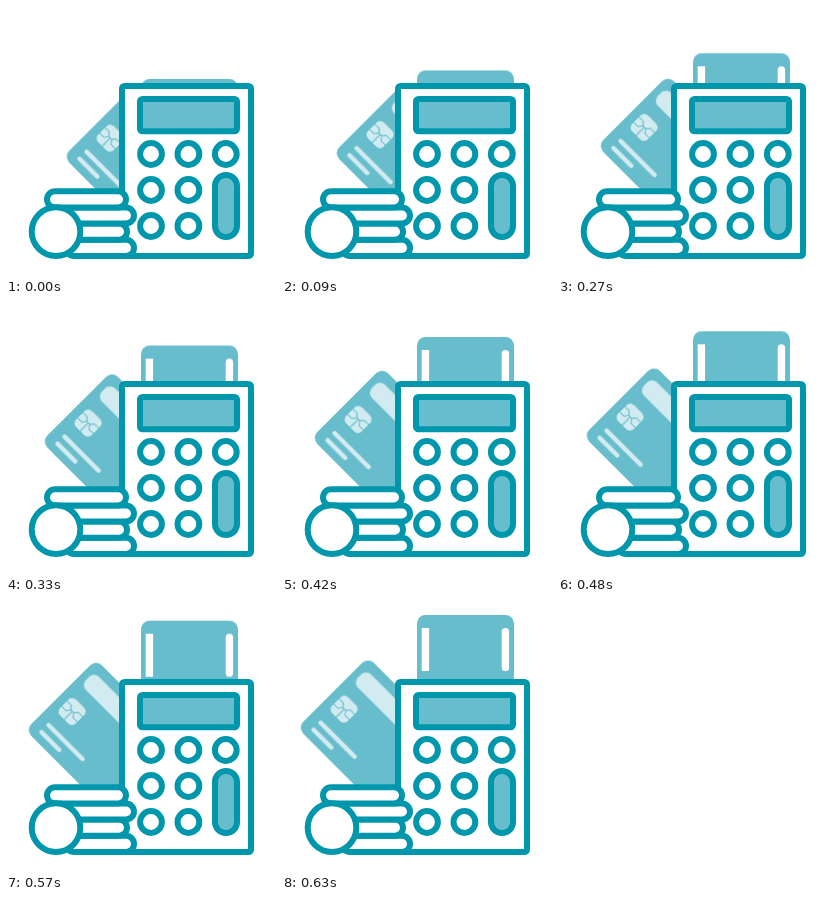
These frames come from a looping animation (270x270 px, 1.26 s). An HTML page without scripts:

```html
<!DOCTYPE html>
<html lang="en">
<head>
<meta charset="utf-8">
<title>Calculator, card and coins</title>
<style>
  :root { --dark: #0097ac; --mid: #67bdcc; --pale: #d1ebf0; }
  html, body { margin: 0; width: 100%; height: 100%; overflow: hidden; background: #fff; }
  svg { display: block; width: 100%; height: 100%; }
  .line { fill: #fff; stroke: var(--dark); stroke-width: 6; }
  .mid { fill: var(--mid); }
  .pale { fill: var(--pale); }
  .white { fill: #fff; }
  .print { stroke: var(--pale); stroke-width: 4.6; stroke-linecap: round; }
  .etch { fill: none; stroke: var(--mid); stroke-width: 1.2; }

  /* Both parts slide out in even steps for half the loop, then rest */
  .slide { animation: slide 1260ms -2ms infinite; }
  .card { --from: translate(42px, 25px); }
  .paper { --from: translate(0, 60px); }
  @keyframes slide {
    0% { transform: var(--from); animation-timing-function: steps(21, end); }
    50%, 100% { transform: translate(0, 0); }
  }
</style>
</head>
<body>
<svg viewBox="0 0 270 270">
  <defs>
    <circle id="key" class="line" r="10.9"/>
  </defs>

  <g class="slide card">
    <g transform="translate(86 55) rotate(45)">
      <rect class="mid" width="130" height="100" rx="8.5"/>
      <rect class="pale" x="7.5" y="10.3" width="115" height="18.4" rx="7"/>
      <g transform="translate(9 42.5)">
        <rect class="pale" width="22" height="22.5" rx="5.5"/>
        <path class="etch" d="M0 7.5H6L9 11H13L16 7.5H22M0 15H6L9 11M13 11L16 15H22M11 11V22.5"/>
      </g>
      <path class="print" d="M13 80H61M13 90H38"/>
    </g>
  </g>

  <g class="slide paper">
    <rect class="mid" x="135" y="13" width="97" height="110" rx="8.5"/>
    <rect class="white" x="139.7" y="26" width="7.4" height="43"/>
    <rect class="white" x="219.7" y="26" width="7.4" height="43" rx="3.6"/>
  </g>

  <g class="calculator">
    <rect class="line" x="116" y="80" width="129" height="170" rx="2.5"/>
    <rect class="line" x="134" y="93" width="97" height="32.3" rx="2.5" style="fill: var(--mid)"/>
    <use href="#key" x="145" y="148"/>
    <use href="#key" x="182.4" y="148"/>
    <use href="#key" x="219.8" y="148"/>
    <use href="#key" x="145" y="184"/>
    <use href="#key" x="182.4" y="184"/>
    <use href="#key" x="145" y="220"/>
    <use href="#key" x="182.4" y="220"/>
    <rect class="line" x="209" y="169" width="22" height="62" rx="11" style="fill: var(--mid)"/>
  </g>

  <g class="coins">
    <rect class="line" x="60" y="233.8" width="68" height="16.2" rx="8.1"/>
    <rect class="line" x="55" y="217.6" width="66" height="16.2" rx="8.1"/>
    <rect class="line" x="60" y="201.4" width="68" height="16.2" rx="8.1"/>
    <rect class="line" x="41" y="185.2" width="79" height="16.2" rx="8.1"/>
    <circle class="line" cx="50" cy="225.6" r="24.3"/>
  </g>
</svg>
</body>
</html>
```
